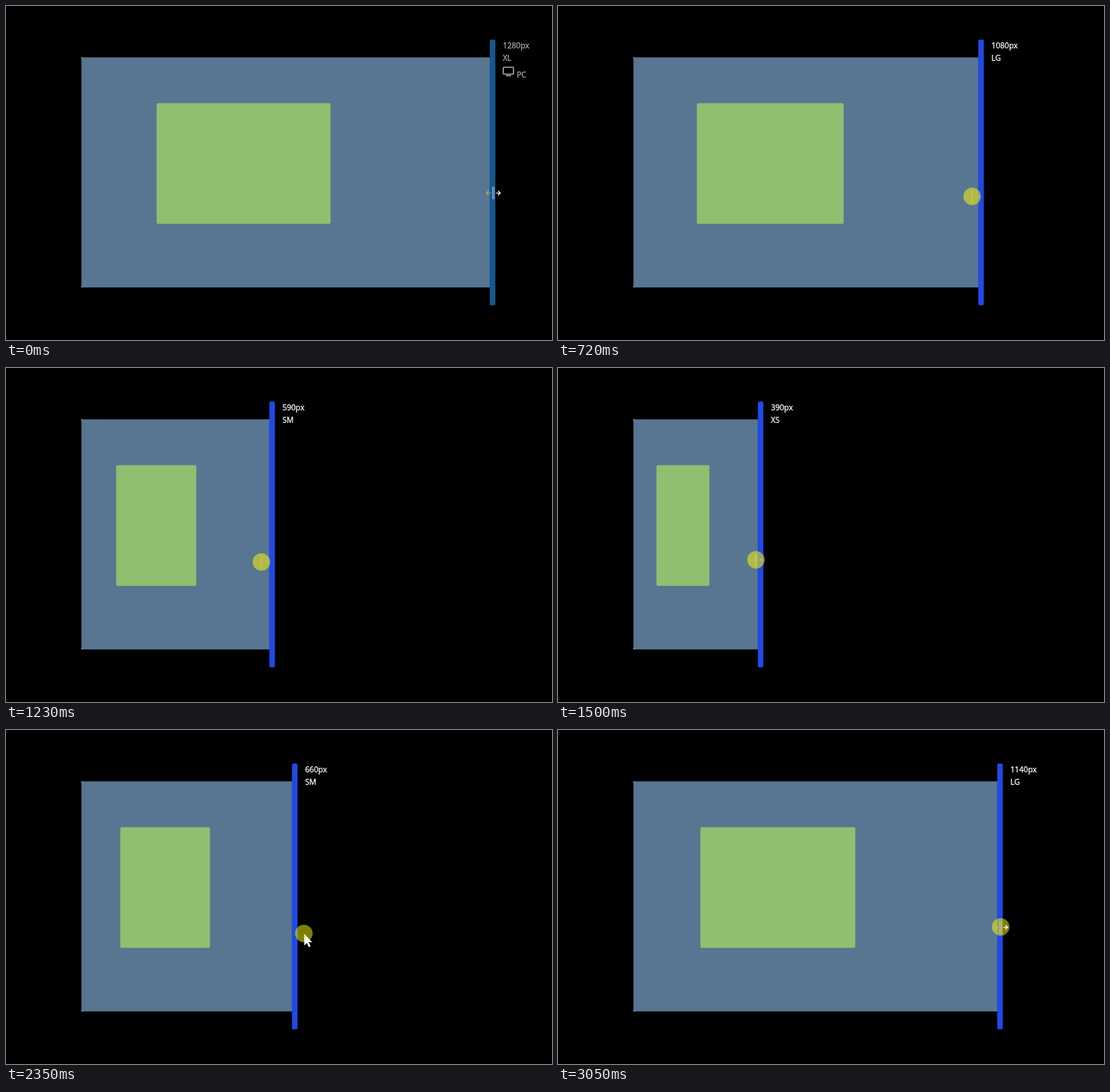
An HTML page that plays this animation: 748x458 px, repeating every 3.21 s.

```html
<!DOCTYPE html>
<html lang="en">
<head>
<meta charset="utf-8">
<title>Responsive resize</title>
<style>
  html, body { margin: 0; width: 100%; height: 100%; overflow: hidden; background: #000; }
  svg { display: block; }
  text { font: 10.6px "Open Sans", "Noto Sans", sans-serif; stroke-width: .3; }
</style>
</head>
<body>
<svg width="748" height="458">
  <rect id="panel" x="103.4" y="70.4" height="315.5" fill="#587691"/>
  <path id="corners" d="M103 70.5h1.5v1h-1.5zM103 384.5h1.5v1h-1.5z" fill="#b9c3cb"/>
  <rect id="box" y="133.2" height="165.6" rx="2" fill="#91be6f"/>
  <rect id="bar" y="46" width="7.6" height="364.4" rx="2"/>
  <g id="label">
    <text id="size" x="17.7" y="58"></text>
    <text id="tier" x="17.7" y="75"></text>
    <g id="device">
      <rect x="18.3" y="84" width="14" height="9.5" rx="1" fill="none" stroke-width="1.6"/>
      <rect x="22.5" y="95" width="6" height="1" stroke-width=".6"/>
      <text x="36.7" y="98">PC</text>
    </g>
  </g>
  <g id="mouse">
    <circle id="halo" r="12" fill="#ff0" fill-opacity=".5"/>
    <g id="resize" fill="none" stroke-width="1.2">
      <path id="west" d="M-3.5 .5H-9.5M-6.5 -2.5L-9.5 .5L-6.5 3.5"/>
      <path id="mid" d="M-1 -8V9M1 -8V9" stroke-width="1"/>
      <path id="east" d="M3.5 .5H9.5M6.5 -2.5L9.5 .5L6.5 3.5"/>
    </g>
    <path id="arrow" d="M.5 .5V16.5L4.2 13L6.7 18.8L9.2 17.7L6.7 12H11.5Z" fill="#fff"/>
  </g>
</svg>
<script>
const LOOP = 3210, LEFT = 103.5, SCALE = 0.4372, PRESS = 30, LAG = 36;

// time, viewport width, pointer height
const drag = [
  [300, 1280, 256], [480, 1230, 255], [960, 870, 267], [1070, 740, 267],
  [1500, 390, 263], [1660, 340, 262], [1860, 340, 262],
  [2020, 440, 268], [2350, 660, 279], [2940, 1090, 271], [3050, 1140, 270]
];
const tiers = [[1200, "XL"], [992, "LG"], [768, "MD"], [576, "SM"], [0, "XS"]];

const $ = id => document.getElementById(id);
const set = (id, attrs) => {
  for (const k in attrs) $(id).setAttribute(k, attrs[k]);
};
const show = (id, on) => set(id, { visibility: on ? "visible" : "hidden" });
const mix = (a, b, p) => `rgb(${a.map((v, i) => Math.round(v + (b[i] - v) * p))})`;

// Smooth curve through the drag points, without overshoot.
function at(t, col) {
  const last = drag.length - 1;
  const i = drag.findIndex(k => k[0] > t) - 1;
  if (i < 0) return drag[t < drag[0][0] ? 0 : last][col];
  const rate = n => n < 0 || n >= last ? 0
    : (drag[n + 1][col] - drag[n][col]) / (drag[n + 1][0] - drag[n][0]);
  const slope = n => {
    const a = rate(n - 1), b = rate(n);
    return a * b > 0 ? 2 * a * b / (a + b) : 0;
  };
  const from = drag[i], to = drag[i + 1], span = to[0] - from[0];
  const u = (t - from[0]) / span, v = 1 - u;
  return from[col] * v * v * (1 + 2 * u) + to[col] * u * u * (1 + 2 * v)
    + span * u * v * (slope(i) * v - slope(i + 1) * u);
}

function draw(t) {
  const w = Math.round(at(t, 1) / 10) * 10;
  const bar = Math.round(LEFT + w * SCALE);
  const pressed = t >= PRESS;
  const p = Math.min(1, Math.max(0, (t - PRESS) / 250));
  const ink = mix([163, 172, 172], [250, 255, 255], p);

  set("panel", { width: bar - LEFT });
  set("box", { x: LEFT + w * 0.0803, width: w * 0.1862 });
  set("bar", { x: bar - 0.2, fill: mix([20, 86, 141], [32, 73, 230], p) });
  set("label", { transform: `translate(${bar})`, fill: ink, stroke: ink });
  $("size").textContent = w + "px";
  $("tier").textContent = tiers.find(k => w >= k[0])[1];
  show("device", w === 1280);

  // The bar trails the pointer.
  const x = LEFT + at(t + LAG, 1) * SCALE + 4.5;
  const outside = x > bar + 8;
  set("mouse", { transform: `translate(${x} ${at(t, 2)})` });
  show("halo", pressed);
  show("resize", !outside);
  show("arrow", outside);
  set("west", { stroke: pressed ? "#bfbb52" : "#bda64a" });
  set("mid", { stroke: pressed ? "#d0c452" : "#9cc8ee" });
  set("east", { stroke: x > bar - 1 ? "#fff" : "#bfbb52" });
}

const start = performance.now();
function tick() {
  draw((performance.now() - start) % LOOP);
  requestAnimationFrame(tick);
}
tick();
</script>
</body>
</html>
```
